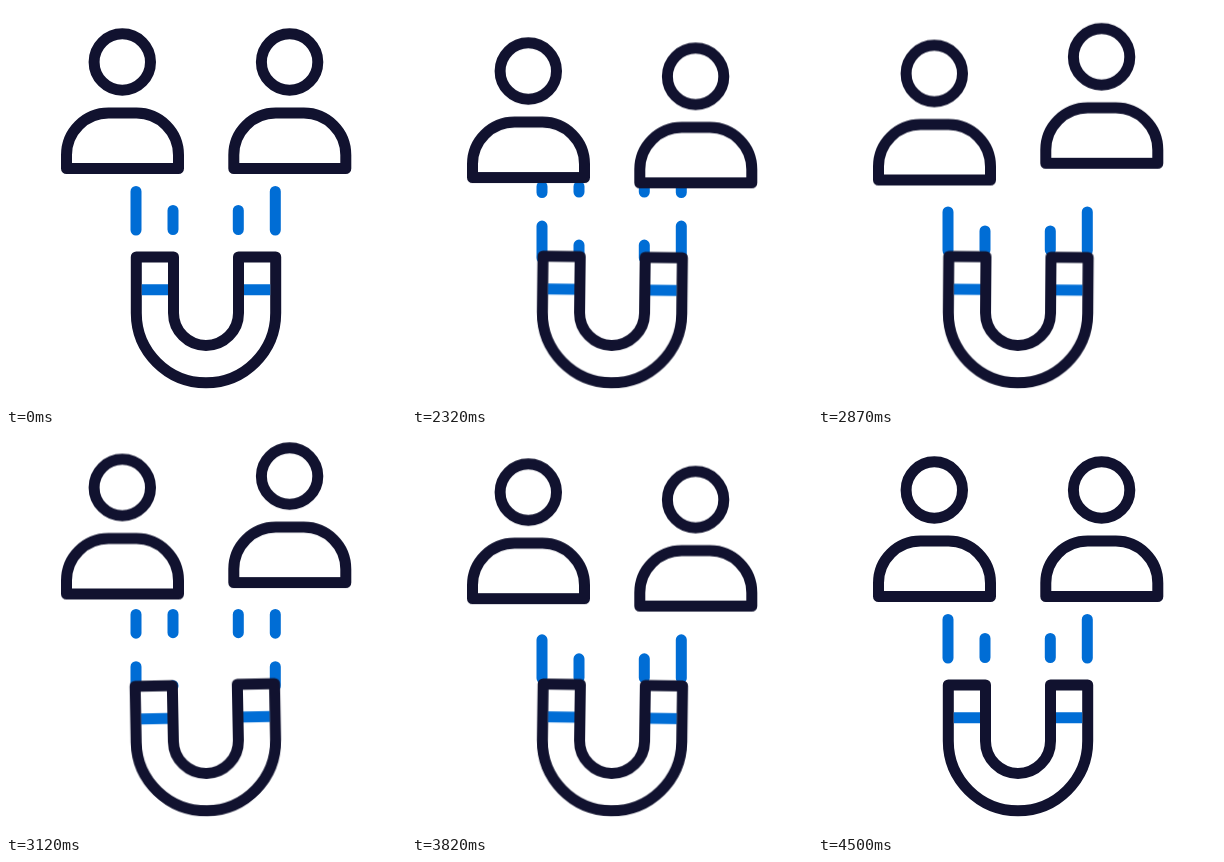
Animation of 400x400 px, one loop 4520 ms. Source, as an HTML page without scripts:

```html
<!DOCTYPE html>
<html lang="en">
<head>
<meta charset="utf-8">
<title>Magnet attracting people</title>
<style>
  @property --flow { syntax: "<length>"; inherits: true; initial-value: 0px; }
  @property --shake { syntax: "<number>"; inherits: true; initial-value: 0; }

  :root { --loop: 4520ms; --navy: #11122f; --blue: #006dd5; }
  html, body { margin: 0; width: 100%; height: 100%; overflow: hidden; background: #fff; }
  svg { display: block; width: 100vw; height: 100vh; }

  .outline {
    fill: #fff; stroke: var(--navy); stroke-width: 11;
    stroke-linecap: round; stroke-linejoin: round;
  }
  .streaks {
    fill: none; stroke: var(--blue); stroke-width: 11; stroke-linecap: round;
    animation: flow var(--loop) linear infinite;
  }
  /* Dashes repeat every 72px and stream down into the magnet. */
  .long { stroke-dasharray: 38.5 33.5; stroke-dashoffset: calc(-5px - var(--flow)); }
  .short { stroke-dasharray: 19 53; stroke-dashoffset: calc(-24px - var(--flow)); }

  .left, .right { animation: var(--loop) cubic-bezier(.37, 0, .63, 1) infinite; }
  .left { animation-name: bob-left; }
  .right { animation-name: bob-right; }

  .shaker { animation: shake var(--loop) step-end infinite; }
  .magnet {
    transform-origin: 200px 313px;
    animation: wobble calc(var(--loop) / 49) cubic-bezier(.37, 0, .63, 1) 1988.6ms infinite;
  }
  .band { fill: none; stroke: var(--blue); stroke-width: 11; }

  @keyframes bob-left {
    0%, 44.69% { transform: translateY(0); }
    57.96% { transform: translateY(18px); }
    75.88% { transform: translateY(-12px); }
    90.27% { transform: translateY(9.5px); }
    99.56%, 100% { transform: translateY(0); }
  }
  @keyframes bob-right {
    0%, 44.69% { transform: translateY(0); }
    54.2% { transform: translateY(18px); }
    68.58% { transform: translateY(-14px); }
    82.3% { transform: translateY(10px); }
    99.56%, 100% { transform: translateY(0); }
  }
  @keyframes flow {
    0%, 44.14% { --flow: 0px; }
    44.69% { --flow: 3px; }
    58.63% { --flow: 69px; }
    69.03% { --flow: 119px; }
    77.88% { --flow: 200px; }
    91.81% { --flow: 276px; }
    99.56%, 100% { --flow: 288px; }
  }
  @keyframes shake {
    0% { --shake: 0; }
    44.65% { --shake: 1; }
    99.5%, 100% { --shake: 0; }
  }
  @keyframes wobble {
    0%, 100% { transform: rotate(0deg); animation-timing-function: ease-out; }
    25% { transform: rotate(calc(var(--shake) * -1.1deg)); }
    75% { transform: rotate(calc(var(--shake) * 1.1deg)); animation-timing-function: ease-in; }
  }
</style>
</head>
<body>
<svg viewBox="0 0 400 400">
  <defs>
    <g id="person">
      <circle cx="116.3" cy="56" r="28.2"/>
      <path d="M60.5 162.5V149a42 42 0 0 1 42-42h28a42 42 0 0 1 42 42v13.5z"/>
    </g>
  </defs>

  <g class="streaks">
    <path class="long" d="M130 180.5V252M269.3 180.5V252"/>
    <path class="short" d="M167 180.5V252M232.3 180.5V252"/>
  </g>

  <g class="outline">
    <g class="left"><use href="#person"/></g>
    <g class="right"><use href="#person" x="167.3"/></g>
  </g>

  <g class="shaker">
    <g class="magnet">
      <path class="outline" d="M130.3 251H167.5V307a32.5 32.5 0 0 0 65 0V251H269.7V307a69.7 69.7 0 0 1-139.4 0z"/>
      <path class="band" d="M135.8 283.8H162M238 283.8H264.2"/>
    </g>
  </g>
</svg>
</body>
</html>
```
